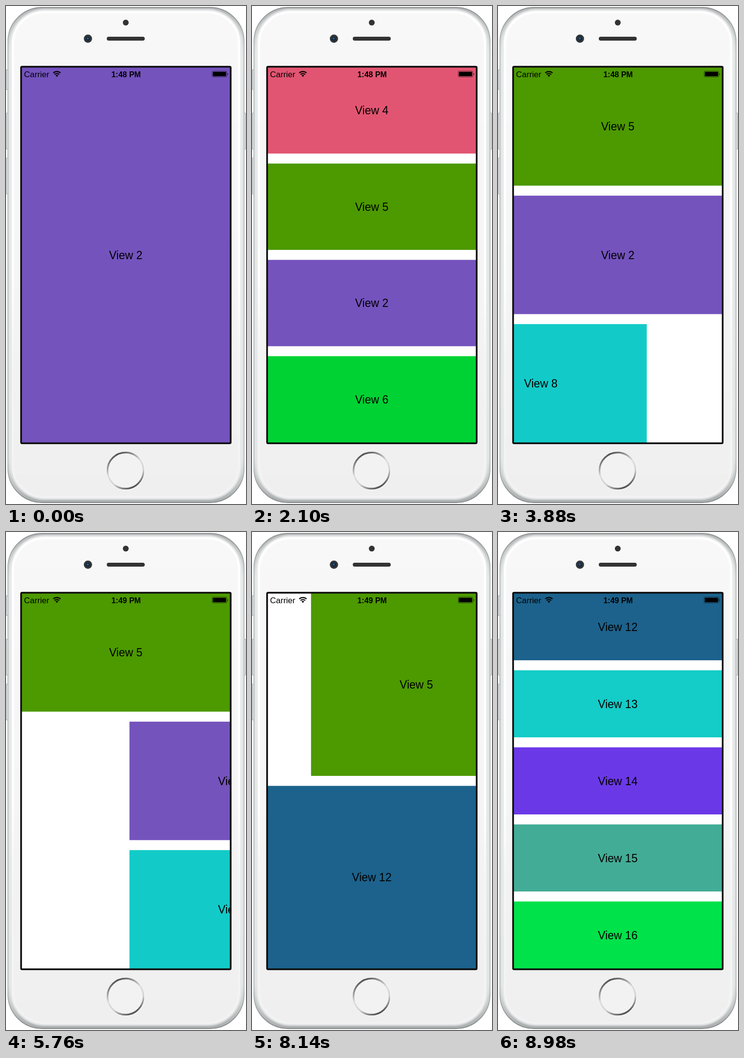
Recreate the animation shown at these times as an HTML page. Size 493 px wide and 1021 px high, loop 9800 ms.

```html
<!DOCTYPE html>
<html lang="en">
<head>
<meta charset="utf-8">
<title>Stack of views</title>
<style>
  html, body { margin: 0; width: 100%; height: 100%; overflow: hidden; background: #fff; }
  svg { display: block; }
  text { font-family: "Liberation Sans", Arial, sans-serif; }
  #views text { font-size: 23px; text-anchor: middle; }
</style>
</head>
<body>
<svg width="493" height="1021" viewBox="0 0 493 1021">
  <defs>
    <linearGradient id="face" x2="0" y2="1">
      <stop offset="0" stop-color="#f8f8f8"/>
      <stop offset=".5" stop-color="#f5f5f5"/>
      <stop offset="1" stop-color="#efefef"/>
    </linearGradient>
    <linearGradient id="shine" x2="0" y2="1">
      <stop offset="0" stop-color="#fff"/>
      <stop offset=".55" stop-color="#fff"/>
      <stop offset=".7" stop-color="#fff" stop-opacity=".2"/>
    </linearGradient>
    <linearGradient id="rim" x2="0" y2="1">
      <stop offset="0" stop-color="#8c9091"/>
      <stop offset=".08" stop-color="#b9bebf"/>
      <stop offset=".92" stop-color="#b9bebf"/>
      <stop offset="1" stop-color="#85898a"/>
    </linearGradient>
    <linearGradient id="band" x2="0" y2="1">
      <stop offset="0" stop-color="#b4b7b8"/>
      <stop offset=".09" stop-color="#dfe3e3"/>
      <stop offset=".91" stop-color="#dfe3e3"/>
      <stop offset="1" stop-color="#a9adae"/>
    </linearGradient>
    <linearGradient id="ring" x1=".2" y1="0" x2=".7" y2="1">
      <stop offset="0" stop-color="#3c3c3c"/>
      <stop offset=".2" stop-color="#8a8a8a"/>
      <stop offset=".45" stop-color="#dedede"/>
      <stop offset=".7" stop-color="#d4d4d4"/>
      <stop offset=".87" stop-color="#888"/>
      <stop offset="1" stop-color="#444"/>
    </linearGradient>
    <filter id="soft"><feGaussianBlur stdDeviation="1.5"/></filter>
    <clipPath id="screen"><rect x="31" y="125" width="431" height="772"/></clipPath>
  </defs>

  <!-- side buttons -->
  <g fill="#e6e9e9" stroke="#979d9e">
    <rect x=".5" y="130.5" width="5" height="41" rx="1.5"/>
    <rect x=".5" y="219.5" width="5" height="74" rx="1.5"/>
    <rect x=".5" y="311.5" width="5" height="74" rx="1.5"/>
    <rect x="487.5" y="219.5" width="5" height="74" rx="1.5"/>
  </g>

  <!-- body -->
  <rect x="4" y="3" width="485" height="1015" rx="70" fill="url(#band)" stroke="url(#rim)" stroke-width="2"/>
  <rect x="9" y="7" width="475" height="1005" rx="70" fill="url(#face)" filter="url(#soft)"/>
  <rect x="10.5" y="9" width="472" height="1001" rx="68" fill="none" stroke="#dce0e0"/>
  <rect x="14.5" y="13" width="464" height="993" rx="64" fill="none" stroke="url(#shine)" stroke-width="4"/>

  <!-- camera, speaker, home button -->
  <circle cx="246" cy="34" r="6" fill="#333"/>
  <circle cx="168.3" cy="67" r="8.5" fill="#333638"/>
  <circle cx="168.3" cy="67" r="4.5" fill="#14273c"/>
  <circle cx="168" cy="66.5" r="2" fill="#2d5f94"/>
  <rect x="207" y="63" width="78" height="8" rx="4" fill="#333"/>
  <circle cx="246" cy="953" r="39.5" fill="#fbfbfb"/>
  <circle cx="245.5" cy="952.5" r="37" fill="#f2f2f2" stroke="url(#ring)" stroke-width="3.5"/>

  <!-- screen -->
  <rect x="31" y="125" width="431" height="772" fill="#fff"/>
  <g id="views" clip-path="url(#screen)"></g>
  <text x="37" y="145.5" font-size="17">Carrier</text>
  <g fill="none" stroke="#000" stroke-width="2.2">
    <path d="M97 137.3a11 11 0 0 1 15 0M99.7 140.4a7 7 0 0 1 9.6 0"/>
    <path d="M104.5 145.3l-2.7-2.9a4 4 0 0 1 5.4 0z" fill="#000" stroke="none"/>
  </g>
  <text id="clock" x="246.7" y="145.5" font-size="16" font-weight="bold" text-anchor="middle"></text>
  <rect x="423.5" y="133.5" width="30" height="12" rx="2" fill="none" stroke="#000" stroke-opacity=".6"/>
  <rect x="425" y="135" width="27" height="9" rx="1" fill="#000"/>
  <path d="M455 137.5q2 2 0 4.5z"/>
  <rect x="31" y="124.6" width="430.5" height="772" rx="2" fill="none" stroke="#0b0b0b" stroke-width="3.5"/>
</svg>
<script>
const LOOP = 9800, DURATION = 1010, CLOCK_TICK = 4500;
const LEFT = 29.7, WIDTH = 434, TOP = 125.5, HEIGHT = 769.5, GAP = 20.5;
// shares of eased progress: slide out, then resize, then slide in
const OUT_END = .323, MOVE_END = .78, IN_START = .815;

const colors = {
  2: '#7453bd', 4: '#e25572', 5: '#4d9900', 6: '#00d234', 8: '#12cbc8',
  12: '#1c628c', 13: '#14ccc8', 14: '#6b38e8', 15: '#43ac96', 16: '#00e24a'
};
const stacks = [[2], [4, 5, 2, 6], [5, 2, 8], [5, 12], [12, 13, 14, 15, 16]];
const starts = [600, 3055, 5475, 7956];

const make = (tag, parent) =>
  parent.appendChild(document.createElementNS('http://www.w3.org/2000/svg', tag));

const views = Object.keys(colors).map(key => {
  const group = make('g', document.getElementById('views'));
  const rect = make('rect', group), label = make('text', group);
  rect.setAttribute('x', LEFT);
  rect.setAttribute('width', WIDTH);
  rect.setAttribute('fill', colors[key]);
  label.setAttribute('x', 246);
  label.textContent = 'View ' + key;
  return { id: +key, group, rect, label };
});
const clock = document.getElementById('clock');

const clamp = v => Math.min(1, Math.max(0, v));
const span = (p, a, b) => clamp((p - a) / (b - a));
const mix = (a, b, p) => a + (b - a) * p;

// cubic-bezier(.42, 0, .58, 1)
function ease(x) {
  let lo = 0, hi = 1;
  for (let i = 0; i < 24; i++) {
    const s = (lo + hi) / 2, r = 1 - s;
    if (1.26 * r * r * s + 1.74 * r * s * s + s * s * s < x) lo = s; else hi = s;
  }
  return lo * lo * (3 - 2 * lo);
}

function slot(stack, id) {
  const i = stack.indexOf(id);
  if (i < 0) return null;
  const h = (HEIGHT + GAP) / stack.length - GAP;
  return { y: TOP + i * (h + GAP), h };
}

function draw(t) {
  const step = Math.max(0, starts.filter(s => s <= t).length - 1);
  const p = ease(clamp((t - starts[step]) / DURATION));
  const out = span(p, 0, OUT_END), move = span(p, OUT_END, MOVE_END), enter = span(p, IN_START, 1);

  for (const { id, group, rect, label } of views) {
    const from = slot(stacks[step], id), to = slot(stacks[step + 1], id);
    const x = !from ? (enter - 1) * WIDTH : !to ? out * WIDTH : 0;
    const shown = (from || to) && Math.abs(x) < WIDTH;
    group.setAttribute('display', shown ? 'inline' : 'none');
    if (!shown) continue;
    const a = from || to, b = to || from;
    const y = mix(a.y, b.y, move), h = mix(a.h, b.h, move);
    group.setAttribute('transform', `translate(${x})`);
    rect.setAttribute('y', y);
    rect.setAttribute('height', h);
    label.setAttribute('y', y + h / 2 + 8.3);
  }
  clock.textContent = t < CLOCK_TICK ? '1:48 PM' : '1:49 PM';
}

function frame() {
  draw(performance.now() % LOOP);
  requestAnimationFrame(frame);
}
frame();
</script>
</body>
</html>
```
